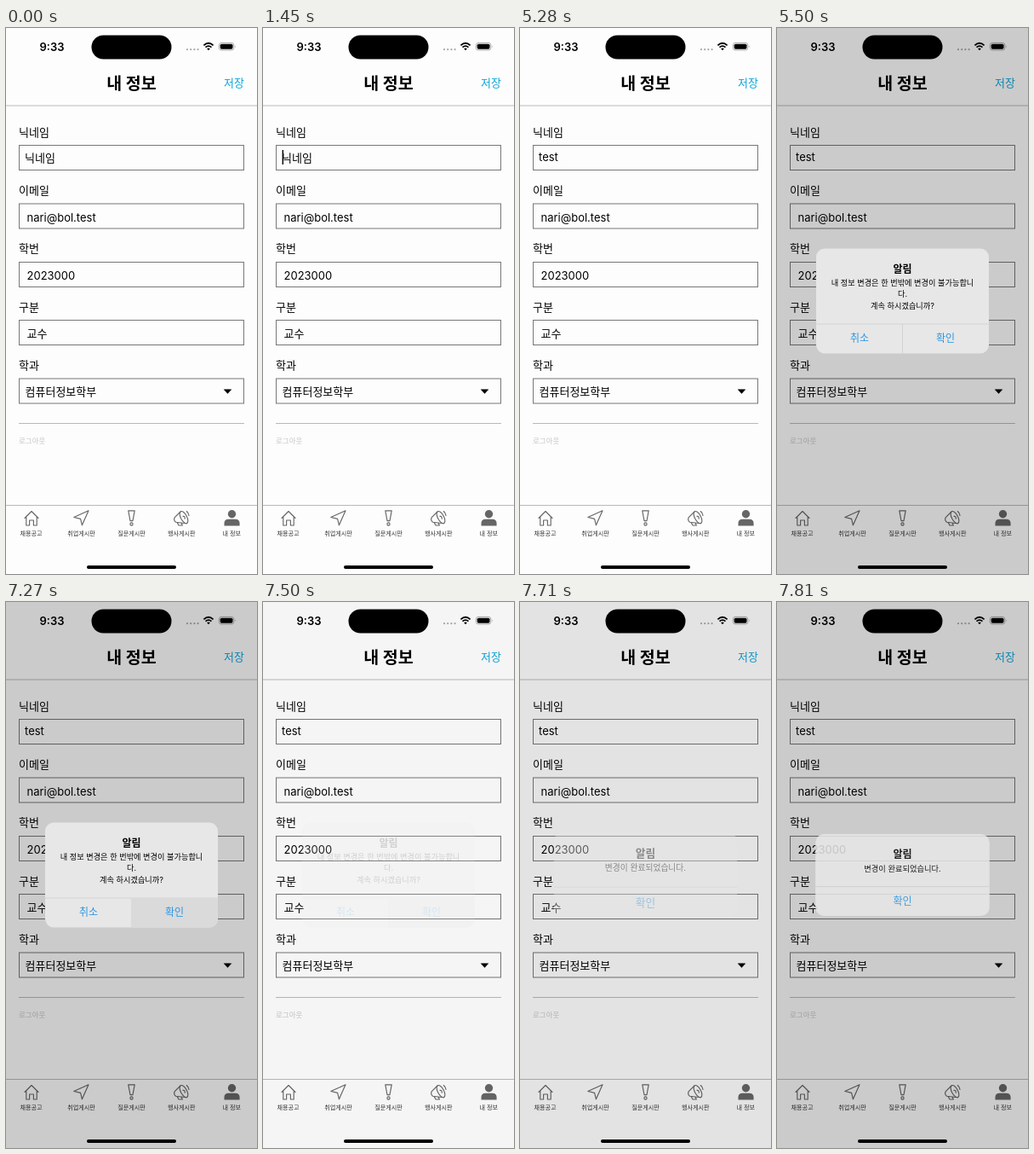
Write an HTML page that moves like this. It is 295 by 640 pixels and loops after 8000 ms.

```html
<!DOCTYPE html>
<html lang="ko">
<head>
<meta charset="utf-8">
<title>내 정보</title>
<style>
  html, body { margin: 0; width: 100%; height: 100%; overflow: hidden; background: #fdfdfd; }
  svg { display: block; width: 100vw; height: 100vh; }
  text { font: 13px Inter, "Noto Sans CJK KR", "Noto Sans CJK JP", sans-serif; fill: #000; }
  .mid { text-anchor: middle; }
  .label { font-weight: 500; }
  .heading { font-size: 19.5px; font-weight: 700; }
  .save { fill: #0ba5dc; }
  .logout { font-size: 8.5px; fill: #c6c6c6; }
  .tab { font-size: 7.1px; fill: #333; text-anchor: middle; }
  .field { fill: none; stroke: #777; }
  .rule { stroke: #b9b9b9; }
  .icon { fill: none; stroke: #666; stroke-width: 1.15; stroke-linejoin: round; stroke-linecap: round; }
  .solid { fill: #666; }

  .alert { transform-origin: 147.5px 320px; }
  .alert text { text-anchor: middle; }
  .alert .name { font-size: 12px; font-weight: 700; }
  .alert .body { font-size: 9.2px; }
  .alert .button { font-size: 12px; fill: #2b96e2; }
  .panel { fill: #e7e7e7; }
  .split { stroke: #c9c9c9; stroke-width: .7; }

  .timed { animation: 8s step-end infinite; }
  .placeholder { animation-name: placeholder; }
  .typed { animation-name: typing; }
  .caret { animation-name: caret-move, caret-blink; }
  .dim { animation-name: dim; }
  .ask { animation-name: ask; }
  .pressed { animation-name: press; }
  .done { animation-name: done; }

  @keyframes placeholder { 0% { opacity: 1 } 27.25%, 100% { opacity: 0 } }
  @keyframes typing {
    0% { width: 0 } 27.25% { width: 4.8px } 34% { width: 12.4px }
    37.875% { width: 19.6px } 40.625%, 100% { width: 40px }
  }
  @keyframes caret-move {
    0% { transform: translateX(0) } 27.25% { transform: translateX(3.6px) }
    34% { transform: translateX(11.6px) } 37.875% { transform: translateX(18.8px) }
    40.625%, 100% { transform: translateX(23.4px) }
  }
  @keyframes caret-blink {
    0% { opacity: 0 } 15% { opacity: .5 } 16.375% { opacity: 1 }
    24.875% { opacity: 0 } 27.25% { opacity: 1 }
    50.25% { opacity: .5 } 51.75% { opacity: 0 } 54.625% { opacity: .5 } 56% { opacity: 1 }
    64.625% { opacity: .5 } 66% { opacity: 0 }
    95.125% { opacity: 1 } 96.375%, 100% { opacity: 0 }
  }
  @keyframes dim {
    0% { opacity: 0 } 67.375% { opacity: .11 } 68.75% { opacity: .2 }
    92.375% { opacity: .12 } 93.75% { opacity: .03 } 95.125% { opacity: 0 }
    96.375% { opacity: .1 } 97.625%, 100% { opacity: .2 }
  }
  @keyframes ask {
    0% { opacity: 0; transform: scale(1.1) } 67.375% { opacity: .5; transform: scale(1.06) }
    68.75% { opacity: 1; transform: none } 92.375% { opacity: .6; transform: none }
    93.75% { opacity: .15; transform: none } 95.125%, 100% { opacity: 0; transform: none }
  }
  @keyframes press { 0% { opacity: 0 } 90.875%, 100% { opacity: 1 } }
  @keyframes done {
    0% { opacity: 0; transform: scale(1.1) } 96.375% { opacity: .4; transform: scale(1.06) }
    97.625%, 100% { opacity: .86; transform: scale(1.008) }
  }
</style>
</head>
<body>
<svg viewBox="0 0 295 640">
  <defs>
    <clipPath id="typed"><rect class="timed typed" x="22" y="140" width="0" height="24"/></clipPath>
    <clipPath id="panel"><rect x="46" y="258.5" width="203" height="123" rx="10"/></clipPath>
  </defs>
  <rect width="295" height="640" fill="#fdfdfd"/>

  <!-- status bar -->
  <text class="mid" x="54" y="26.5" font-weight="600" style="font-weight:600">9:33</text>
  <rect x="100.5" y="8.5" width="94" height="28" rx="14"/>
  <path d="M213 25.2H227" stroke="#aaa" stroke-width="2.2" stroke-linecap="round" stroke-dasharray="0 4.2"/>
  <g fill="none" stroke="#000" stroke-width="1.8">
    <path d="M232.4 20.3Q238 15.3 243.6 20.3M234.5 22.7Q238 19.6 241.5 22.7"/>
    <path d="M236.2 24.2Q238 22.8 239.8 24.2L238 26.2Z" fill="#000" stroke="none"/>
  </g>
  <rect x="250.4" y="17.4" width="17.4" height="8.6" rx="2.7" fill="none" stroke="#999" stroke-width=".8"/>
  <rect x="251.7" y="18.7" width="14.8" height="6" rx="1.6"/>
  <path d="M269 20.2q1.3 1.5 0 3z" fill="#999"/>

  <!-- header -->
  <text class="heading mid" x="147.5" y="72">내 정보</text>
  <text class="save" x="256" y="69">저장</text>
  <path class="rule" d="M0 91H295"/>

  <!-- form -->
  <text class="label" x="15" y="126.7">닉네임</text>
  <text class="label" x="15" y="195">이메일</text>
  <text class="label" x="15" y="263.3">학번</text>
  <text class="label" x="15" y="331.8">구분</text>
  <text class="label" x="15" y="400">학과</text>
  <rect class="field" x="15.5" y="137.5" width="264" height="29"/>
  <rect class="field" x="15.5" y="206" width="264" height="29"/>
  <rect class="field" x="15.5" y="274.5" width="264" height="29"/>
  <rect class="field" x="15.5" y="342.5" width="264" height="29"/>
  <rect class="field" x="15.5" y="411" width="264" height="29"/>
  <text class="timed placeholder" x="22" y="156.5">닉네임</text>
  <g clip-path="url(#typed)"><text x="22" y="156.3">test</text></g>
  <rect class="timed caret" x="22.6" y="143" width="1.4" height="17"/>
  <text x="24.5" y="226.6">nari@bol.test</text>
  <text x="24.5" y="295">2023000</text>
  <text x="24.5" y="363.3">교수</text>
  <text x="22.5" y="431">컴퓨터정보학부</text>
  <path d="M256.3 423.8H264.7L260.5 428.4Z" stroke="#000" stroke-width=".6" stroke-linejoin="round"/>
  <path class="rule" d="M15 463.5H280"/>
  <text class="logout" x="15" y="487.3">로그아웃</text>

  <!-- tab bar -->
  <path class="rule" d="M0 559.5H295"/>
  <path class="icon" d="M22 574.5L30 566.5L38 574.5M23.8 573V583H27.6V577H32.4V583H36.2V573"/>
  <path class="icon" d="M79.8 573.5L97 565.8L89.4 582.8L87.6 575.4Z"/>
  <path class="icon" d="M143.8 565.8H151.2L149 577.6H146Z"/>
  <circle class="icon" cx="147.5" cy="581.5" r="1.6"/>
  <g class="icon">
    <ellipse cx="209" cy="573.6" rx="3.6" ry="7.8" transform="rotate(-28 209 573.6)"/>
    <path d="M205 567L198.3 573.6Q196.6 577 199.5 579.3L212 580.8M201.2 579.8L203 583H207.4L206 580.3M208 572.4Q210.5 572 210.2 575.2M212.3 566.5Q214.8 568.5 215 571.5"/>
  </g>
  <circle class="solid" cx="265.5" cy="569.8" r="4.7"/>
  <path class="solid" d="M256.5 583.5V580.5Q256.5 575.8 261.5 575.8H269.5Q274.6 575.8 274.6 580.5V583.5Z"/>
  <text class="tab" x="29.5" y="594.8">채용공고</text>
  <text class="tab" x="88.5" y="594.8">취업게시판</text>
  <text class="tab" x="147.5" y="594.8">질문게시판</text>
  <text class="tab" x="206.3" y="594.8">행사게시판</text>
  <text class="tab" x="265.2" y="594.8">내 정보</text>

  <rect class="timed dim" width="295" height="640" opacity="0"/>
  <rect x="95" y="630" width="105" height="4" rx="2"/>

  <g class="alert timed ask">
    <rect class="panel" x="46" y="258.5" width="203" height="123" rx="10"/>
    <path class="split" d="M46 347H249M147.5 347V381.5"/>
    <rect class="timed pressed" x="147" y="347" width="102" height="35" fill="#dadada" clip-path="url(#panel)"/>
    <text class="name" x="147.5" y="286.6">알림</text>
    <text class="body" x="147.5" y="302.2">내 정보 변경은 한 번밖에 변경이 불가능합니</text>
    <text class="body" x="147.5" y="315.4">다.</text>
    <text class="body" x="147.5" y="328.6">계속 하시겠습니까?</text>
    <text class="button" x="97" y="368">취소</text>
    <text class="button" x="198" y="368">확인</text>
  </g>

  <g class="alert timed done">
    <rect class="panel" x="46" y="272.5" width="203" height="95" rx="10"/>
    <path class="split" d="M46 333.5H249"/>
    <text class="name" x="147.5" y="300">알림</text>
    <text class="body" x="147.5" y="315.6">변경이 완료되었습니다.</text>
    <text class="button" x="147.5" y="354.5">확인</text>
  </g>
</svg>
</body>
</html>
```
